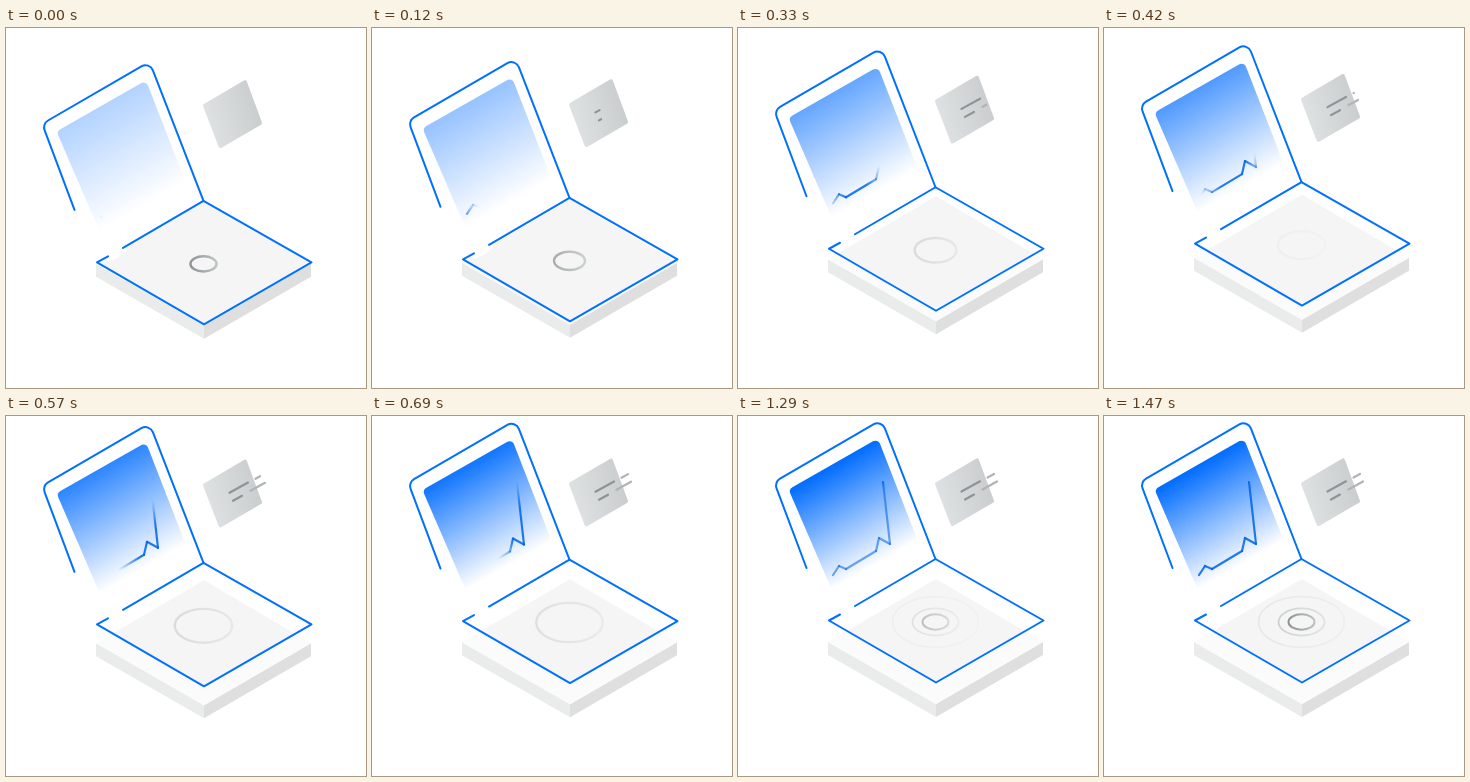
Write an HTML page with a canvas that moves like this. It is 360 by 360 pixels and loops after 1.5 s.

```html
<!DOCTYPE html>
<html lang="en">
<head>
<meta charset="utf-8">
<title>Device loop</title>
<style>
  html, body { margin: 0; width: 100%; height: 100%; overflow: hidden; background: #fff; }
  canvas { display: block; width: 360px; height: 360px; }
</style>
</head>
<body>
<canvas id="stage" width="360" height="360"></canvas>
<script>
const ctx = document.getElementById('stage').getContext('2d');
const LOOP = 1500, BLUE = '#0070ff';
const clamp = v => Math.max(0, Math.min(1, v));
const ramp = (t, from, to) => clamp((t - from) / (to - from));
const rise = t => (1 - Math.cos(Math.PI * ramp(t, -60, 760))) / 2;

function trace(points, radius = 0, closed = false) {
  ctx.beginPath();
  const n = points.length;
  if (closed) ctx.moveTo(...[0, 1].map(k => (points[n - 1][k] + points[0][k]) / 2));
  else ctx.moveTo(...points[0]);
  points.forEach((p, i) => {
    if (!closed && (i === 0 || i === n - 1)) ctx.lineTo(...p);
    else ctx.arcTo(...p, ...points[(i + 1) % n], radius);
  });
  if (closed) ctx.closePath();
}

function fill(points, style, radius = 0) {
  trace(points, radius, true);
  ctx.fillStyle = style;
  ctx.fill();
}

function stroke(points, style, width, radius = 0) {
  trace(points, radius);
  ctx.strokeStyle = style;
  ctx.lineWidth = width;
  ctx.stroke();
}

function gradient(x0, y0, x1, y1, stops) {
  const g = ctx.createLinearGradient(x0, y0, x1, y1);
  stops.forEach((c, i) => g.addColorStop(i / (stops.length - 1), c));
  return g;
}

function shifted(dy, draw) {
  ctx.save();
  ctx.translate(0, dy);
  draw();
  ctx.restore();
}

const plate = [[197.5, 143], [305.5, 204.5], [198, 266.5], [91, 204.5]];
const baseTop = [[198, 163], [305, 226], [198, 288], [90, 226]];

function drawBase(dy, plateDy) {
  const [, right, front, left] = baseTop;
  const side = corner => [corner, front, [front[0], front[1] + 13], [corner[0], corner[1] + 13]];
  shifted(dy, () => {
    fill(side(left), '#eaeceb');
    fill(side(right), '#dedfde');
    fill(baseTop, '#fbfbfb');
  });
  // The plate tints the base beneath it and is white elsewhere.
  ctx.save();
  trace(plate.map(([x, y]) => [x, y + plateDy]), 0, true);
  ctx.clip();
  shifted(dy, () => fill(baseTop, '#f5f5f5'));
  ctx.restore();
}

function ring(rx, alpha, width) {
  ctx.globalAlpha = alpha;
  ctx.strokeStyle = gradient(197.5 - rx, 206, 197.5 + rx, 206, ['#8d9294', '#bec2c3']);
  ctx.lineWidth = width;
  ctx.beginPath();
  ctx.ellipse(197.5, 206, rx, rx * 0.59, 0, 0, Math.PI * 2);
  ctx.stroke();
  ctx.globalAlpha = 1;
}

// One ring spreads and fades, brightening once on the way; three more then fade in.
function drawRings(t) {
  const echo = 0.28 * ramp(t, 400, 520) * (1 - ramp(t, 520, 1250));
  ring(13 + 0.0185 * t + 1.57e-5 * t * t, Math.max(1 - ramp(t, 0, 450), echo), 2.4);
  const back = ramp(t, 1090, 1470);
  [13, 23, 43].forEach((rx, i) => ring(rx, back * 0.37 ** i, 2 - i * 0.2));
}

function drawCard(t, dy) {
  // x, y, width, start time
  const lines = [[223.5, 75.5, 18.5, 70], [227, 83.5, 9, 70], [244.5, 73.5, 14.5, 270], [249.5, 61.5, 6.5, 410]];
  shifted(dy, () => {
    fill([[196.5, 67], [240, 41.5], [256.5, 86], [213.5, 111]],
      gradient(200, 85, 254, 70, ['#dfe2e2', '#c9cdce']), 2);
    lines.forEach(([x, y, width, start], i) => {
      const grown = width * ramp(t, start, start + 230);
      if (grown) stroke([[x, y], [x + grown, y - grown * 0.55]], i < 2 ? '#8f9496' : '#b0b4b6', 2.2);
    });
  });
}

const chart = [[95, 159], [101, 150], [108, 153], [138, 135], [141, 122], [152, 128], [145, 66]];

// A soft-ended streak runs along the chart, then the whole line fades in.
function drawChart(t, k) {
  const head = 145 * k + 25 * ramp(t, 700, 1050), tail = 0.13 * (t - 390);
  const whole = ramp(t, 1000, 1440);
  const alphaAt = s => 0.85 * Math.max(whole, clamp((head - s) / 25) * clamp((s - tail) / 25));
  let start = 0;
  chart.slice(1).forEach((b, i) => {
    const a = chart[i], length = Math.hypot(b[0] - a[0], b[1] - a[1]);
    const stops = Array.from({ length: 13 }, (_, n) => `rgba(0,100,230,${alphaAt(start + length * n / 12)})`);
    stroke([a, b], gradient(...a, ...b, stops), 2.2);
    start += length;
  });
}

function drawScreen(t) {
  ctx.globalAlpha = 0.3 + 0.7 * ramp(t, 0, 760);
  fill([[50.5, 73.5], [140, 22.5], [183, 133], [97, 181]],
    gradient(95, 48, 149, 142, ['#006cff', 'rgba(0,108,255,0)']), 5);
  ctx.globalAlpha = 1;
}

function drawOutline() {
  stroke([[104, 198], [115, 191.5]], '#fff', 11);
  stroke([[68.5, 152], [36.2, 66], [143.5, 3.7], [197.5, 143]], BLUE, 2, 8);
  stroke([[102, 198.5], plate[3], plate[2], plate[1], plate[0], [117, 190]], BLUE, 2);
}

function render(now) {
  const t = now % LOOP, k = rise(t);
  const high = 30.3 * (1 - k), low = 10 * (1 - k);
  ctx.clearRect(0, 0, 360, 360);
  ctx.lineCap = ctx.lineJoin = 'round';
  drawBase(low, high);
  drawCard(t, low);
  shifted(high, () => {
    drawRings(t);
    drawScreen(t);
    drawChart(t, k);
    drawOutline();
  });
}

const began = performance.now();
function tick() {
  render(performance.now() - began);
  requestAnimationFrame(tick);
}
tick();
</script>
</body>
</html>
```
